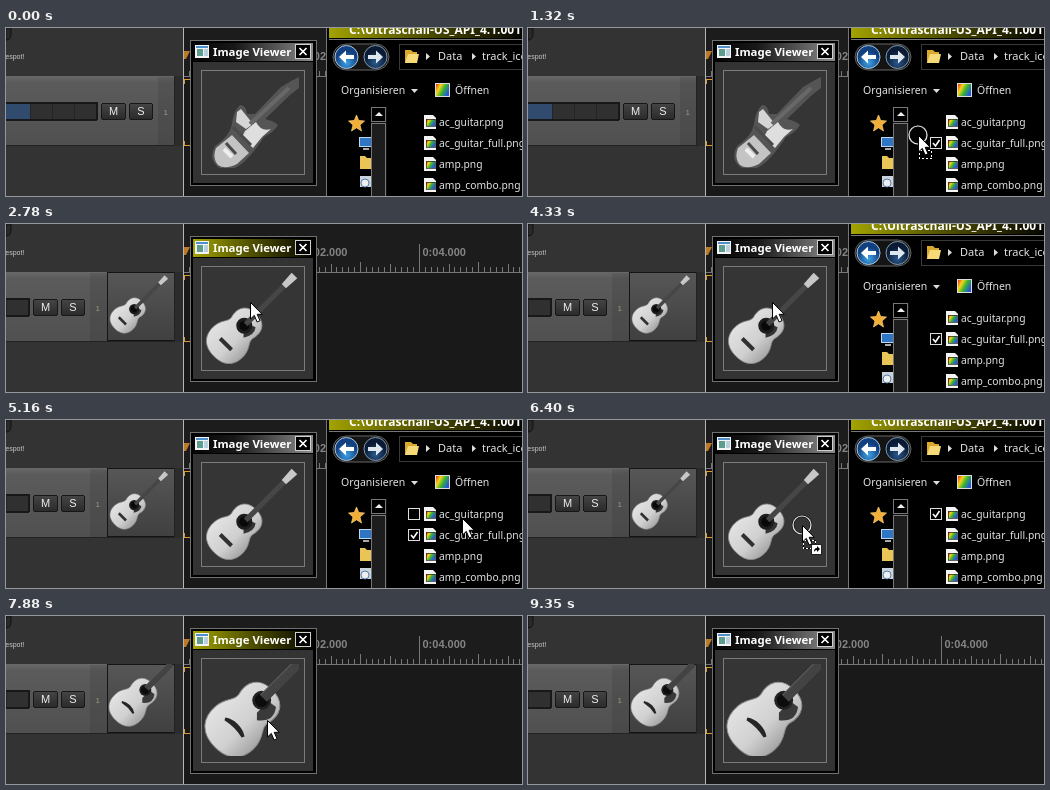
Write an HTML page that moves like this. It is 516 by 168 pixels and loops after 9450 ms.

```html
<!DOCTYPE html>
<html lang="en">
<head>
<meta charset="utf-8">
<title>Track icon by drag and drop</title>
<style>
html, body { margin: 0; width: 100%; height: 100%; overflow: hidden; background: #191919; }
svg { display: block; width: 516px; height: 168px; }
text { font-family: "Noto Sans", "Open Sans", sans-serif; fill: #e2e2e2; white-space: pre; }
.b { font-weight: 700; fill: #fff; }
.r { font: 700 11px "Liberation Sans", Arial, sans-serif; fill: #858585; }
.k { font: 11px "Liberation Sans", Arial, sans-serif; fill: #eee; text-anchor: middle; }
rect, .c { shape-rendering: crispEdges; }
</style>
</head>
<body>
<svg viewBox="0 0 516 168">
<defs>
  <linearGradient id="on"><stop offset="0" stop-color="#a3a300"/><stop offset=".45" stop-color="#555500"/><stop offset="1" stop-color="#050500"/></linearGradient>
  <linearGradient id="off"><stop offset="0" stop-color="#050505"/><stop offset=".35" stop-color="#181818"/><stop offset="1" stop-color="#8c8c8c"/></linearGradient>
  <linearGradient id="track" x2="0" y2="1"><stop offset="0" stop-color="#686868"/><stop offset=".1" stop-color="#5b5b5b"/><stop offset="1" stop-color="#505050"/></linearGradient>
  <linearGradient id="cell" x2="0" y2="1"><stop offset="0" stop-color="#575757"/><stop offset=".5" stop-color="#4b4b4b"/><stop offset="1" stop-color="#404040"/></linearGradient>
  <linearGradient id="btn" x2="0" y2="1"><stop offset="0" stop-color="#454545"/><stop offset="1" stop-color="#2a2a2a"/></linearGradient>
  <linearGradient id="wood" x1="0" y1="0" x2="0" y2="1"><stop offset="0" stop-color="#e2e2e2"/><stop offset=".6" stop-color="#d0d0d0"/><stop offset="1" stop-color="#a6a6a6"/></linearGradient>
  <linearGradient id="rain" x2="1" y2=".5"><stop offset="0" stop-color="#e02020"/><stop offset=".35" stop-color="#f6d418"/><stop offset=".65" stop-color="#35b332"/><stop offset="1" stop-color="#2858d8"/></linearGradient>
  <radialGradient id="blue" cy=".75"><stop offset="0" stop-color="#3fa4e8"/><stop offset="1" stop-color="#123f80"/></radialGradient>
  <radialGradient id="navy" cy=".75"><stop offset="0" stop-color="#2b5a8c"/><stop offset="1" stop-color="#0a1a34"/></radialGradient>
  <clipPath id="pic"><rect x="196" y="48" width="97" height="92"/></clipPath>
  <clipPath id="panel"><rect y="48" width="168" height="69"/></clipPath>

  <path id="body" d="M-20 0C-20-16-10-22 2-21C12-20 14-14 20-15C30-18 40-14 40 0C40 14 30 18 20 15C14 14 12 20 2 21C-10 22-20 16-20 0Z"/>
  <g id="full">
    <g transform="translate(222 118) rotate(-45)">
      <use href="#body" fill="url(#wood)" stroke="#8d8d8d" stroke-width=".8"/>
      <path d="M14 8Q24 14 30 9L28 4H18Z" fill="#333"/>
      <circle cx="23" r="8" fill="#1d1d1d"/><circle cx="23" r="5" fill="#090909"/>
      <path d="M25-2.6H80V2.6H25Z" fill="#464646"/>
      <path d="M79-3L94-4V4L79 3Z" fill="#c8c8c8"/>
      <path d="M-5-8H-1V8H-5Z" fill="#303030"/>
    </g>
  </g>
  <g id="half">
    <g transform="translate(228 112) rotate(-45) scale(1.35)">
      <use href="#body" fill="url(#wood)" stroke="#8d8d8d" stroke-width=".7"/>
      <path d="M16 8Q24 18 33 11L32 4H20Z" fill="#3a3a3a"/>
      <circle cx="29" r="7" fill="#222"/><circle cx="29" r="5" fill="#0c0c0c"/>
      <path d="M31-3.4H72V3.4H31Z" fill="#434343"/>
      <path d="M31-3.4H72" stroke="#5c5c5c" stroke-width=".8"/>
      <path d="M1-10Q4-6 4 0Q4 6 1 10L-1 9Q1 0-1-9Z" fill="#262626"/>
    </g>
  </g>
  <g id="electric">
    <path d="M275 59L287 52L293 49V60L284 67L259 91Q268 93 272 97Q268 104 258 109Q250 122 238 134Q224 146 212 139Q202 131 209 118Q224 108 226 96Q227 84 234 77Q240 77 241 86L249 86Z" fill="#555"/>
    <path d="M231 84L235 81L247 96L240 101L230 94Z" fill="#d6d6d6"/>
    <path d="M210 120L226 107L243 125L231 136Q219 142 212 137Q206 130 210 120Z" fill="#c4c4c4"/>
    <path d="M239 103L250 94Q255 104 265 101L256 109L247 120L236 109Z" fill="#dedede"/>
    <path d="M227 99L245 117M220 115L230 126" stroke="#4a4a4a" stroke-width="3"/>
    <path d="M218 121L226 129" stroke="#eee" stroke-width="4"/>
    <path d="M244 96L283 60" stroke="#686868" stroke-width="4"/>
  </g>
  <g id="file">
    <path d="M0 0H9L12 3V14H0Z" fill="#f4f4f4"/>
    <rect x="2" y="4" width="9" height="7" fill="url(#rain)" stroke="#222" stroke-width=".7"/>
  </g>
</defs>

<rect width="516" height="168" fill="#191919"/>
<rect x="178" width="338" height="48" fill="#1c1c1c"/>
<path id="ticks" class="c" stroke="#777" fill="none"/>
<text class="r" x="298" y="32">0:02.000</text>
<text class="r" x="416.5" y="32">0:04.000</text>

<rect width="177" height="168" fill="#333"/>
<path d="M0 0H5V6Q5 12 0 12Z" fill="#292929" stroke="#111"/>
<text x="-3" y="31" style="font:7px 'Liberation Sans',Arial,sans-serif;fill:#c8c8c8">respot!</text>
<g clip-path="url(#panel)">
  <rect y="48" width="168" height="69" fill="url(#track)"/>
  <g id="strip">
    <rect x="-20" y="74" width="112" height="19" rx="2" fill="#181818"/>
    <rect x="-20" y="76" width="110" height="15" fill="#303030"/>
    <rect x="-20" y="76" width="44" height="15" fill="#304b6d"/>
    <path class="c" d="M24.5 76V91M46.5 76V91M68.5 76V91" stroke="#252525"/>
    <rect x="95.5" y="75.5" width="24" height="16" rx="2" fill="url(#btn)" stroke="#171717"/>
    <rect x="123.5" y="75.5" width="23" height="16" rx="2" fill="url(#btn)" stroke="#171717"/>
    <text class="k" x="107.5" y="87">M</text><text class="k" x="135" y="87">S</text>
    <rect x="152" y="49" width="17" height="68" fill="#000" opacity=".09"/>
    <text x="157.5" y="87" style="font:8px 'Liberation Sans',Arial,sans-serif;fill:#a0957c">1</text>
  </g>
  <g id="icon">
    <rect x="101" y="48" width="67" height="69" fill="#141414"/>
    <rect x="102" y="49" width="66" height="67" fill="url(#cell)"/>
    <use id="thumb" transform="translate(-24.3 20) scale(.64)"/>
  </g>
</g>
<path class="c" d="M0 117.5H168M168.5 48V118" stroke="#222"/>
<rect x="169" y="48" width="8" height="70" fill="#2b2b2b"/>
<rect x="177" width="1" height="168" fill="#b5b5b5"/>
<path d="M178 23H184L180 31H178Z" fill="#bd7b25"/>
<path class="c" d="M184 51.5H178.5V56M184 117.5H178.5V113" stroke="#dc992f" fill="none"/>

<g>
  <rect x="184" y="12" width="127" height="146" fill="#000"/>
  <rect x="184.5" y="12.5" width="126" height="145" fill="none" stroke="#707070"/>
  <rect id="bar" x="187" y="15" width="120" height="18"/>
  <rect x="189" y="17" width="14" height="13" fill="#f4f4f4"/>
  <rect x="190" y="18" width="12" height="2" fill="#4f8fc9"/>
  <rect x="191" y="21" width="6" height="7" fill="#5e9d8d"/>
  <rect x="198" y="21" width="4" height="7" fill="#b8d0e0"/>
  <text class="b" x="207" y="28" font-size="11.4">Image Viewer</text>
  <rect x="289.5" y="16.5" width="15" height="14" fill="#000" stroke="#d0d0d0"/>
  <path d="M293.5 20L300.5 27M300.5 20L293.5 27" stroke="#fff" stroke-width="1.7"/>
  <rect x="187" y="34" width="120" height="121" fill="#333"/>
  <rect x="195.5" y="42.5" width="103" height="104" fill="#353535" stroke="#7b7b7b"/>
  <g clip-path="url(#pic)"><use id="photo"/></g>
</g>

<g id="explorer">
  <rect x="320" width="196" height="168" fill="#000"/>
  <rect x="320" width="1" height="168" fill="#777"/>
  <rect x="323" width="193" height="10" fill="url(#on)"/>
  <text class="b" x="343" y="6" font-size="12">C:\Ultraschall-US_API_4.1.001</text>
  <path class="c" d="M323 11.5H516" stroke="#777"/>
  <path d="M340 16H370Q382 17 383 29Q382 41 370 42H340Q328 41 327 29Q328 17 340 16Z" fill="#141414" stroke="#666"/>
  <circle cx="340.5" cy="29" r="11.5" fill="url(#blue)" stroke="#a9c8dd"/>
  <circle cx="369.5" cy="29" r="11.5" fill="url(#navy)" stroke="#8198aa"/>
  <path id="back" d="M333 29L340 22.5V27H348V31H340V35.5Z" fill="#fff"/>
  <path d="M377 29L370 22.5V27H362V31H370V35.5Z" fill="#dfe7ee"/>
  <path class="c" d="M516 16.5H393.5V41.5H516" fill="none" stroke="#3a3a3a"/>
  <path d="M399 22H405L407 24H411V35H399Z" fill="#d9a92d"/><path d="M402 26H413L411 35H399Z" fill="#f6da78"/>
  <path d="M420 25L424 28.5L420 32ZM466 25L470 28.5L466 32Z" fill="#ddd"/>
  <text x="432" y="32" font-size="11">Data</text>
  <text x="476" y="32" font-size="11">track_icons</text>
  <text x="335" y="66" font-size="10.5">Organisieren</text>
  <path d="M405 61H412L408.5 65Z" fill="#ddd"/>
  <rect x="429.5" y="55.5" width="14" height="13" fill="url(#rain)" stroke="#ddd"/>
  <text x="449" y="66" font-size="10.5">Öffnen</text>
  <path d="M350.500 87L352.700 92.500L358.500 93L354 97L355.500 103L350.500 99.800L345.500 103L347 97L342.500 93L348.300 92.500Z" fill="#f3ae35" stroke="#ffd680" stroke-width=".7"/>
  <rect x="353.500" y="109.500" width="12" height="9" fill="#2e75c4" stroke="#bcd6ee"/><rect x="357" y="120" width="6" height="2" fill="#aaa"/>
  <path d="M354 128H359L361 130H365V141H354Z" fill="#e9c456"/>
  <rect x="354" y="148" width="11" height="11" fill="#c9d3dc"/><circle cx="359" cy="155" r="4" fill="#eee" stroke="#557eaa"/>
  <rect x="365" y="79" width="16" height="89" fill="#111"/>
  <rect x="365.500" y="79.500" width="14" height="14" fill="#000" stroke="#777"/>
  <path d="M369 88H377L373 84Z" fill="#eee"/>
  <rect x="365.500" y="95.500" width="14" height="80" fill="#1d1d1d" stroke="#777"/>
  <g id="rows"></g>
</g>

<g id="cursor">
  <g id="dots">
    <rect x="1.500" y="15.500" width="12" height="8" fill="none" stroke="#000"/>
    <rect x="1.500" y="15.500" width="12" height="8" fill="none" stroke="#fff" stroke-dasharray="2 2"/>
  </g>
  <g id="link">
    <rect x="9.500" y="19.500" width="10" height="10" fill="#fff" stroke="#222"/>
    <path d="M12 27Q12 23 15 23V21L18 24L15 27V25Q13 25 12 27Z" fill="#000"/>
  </g>
  <circle id="ring" r="9" fill="none" stroke="#111" stroke-width="2.400"/>
  <circle id="halo" r="9" fill="none" stroke="#e8e8e8" stroke-width="1.200"/>
  <path d="M.5 .5V17L4.300 13.400L7.100 20L10 18.700L7.200 12.300H12.200Z" fill="#fff" stroke="#000"/>
</g>
</svg>
<script>
const LOOP = 9450;
const $ = id => document.getElementById(id);
const show = (id, on) => $(id).setAttribute("display", on ? "inline" : "none");
const within = (t, a, b) => t >= a && t < b;

let marks = "M178 48.5H516";
for (let i = -20; i < 38; i++) {
  const h = i % 20 === 0 ? 28 : i % 10 === 0 ? 10 : i % 5 === 0 ? 8 : 5;
  const x = Math.round(295 + i * 5.9) + .5;
  if (x > 178) marks += `M${x} 48V${48 - h}`;
}
$("ticks").setAttribute("d", marks);

const files = ["ac_guitar", "ac_guitar_full", "amp", "amp_combo"];
$("rows").innerHTML = files.map((name, i) => `
  <g transform="translate(0 ${94 + 21 * i})">
    <g id="box${i}"><rect x="402.5" y="-5.5" width="11" height="11" fill="#000" stroke="#ddd"/>
    <path id="tick${i}" d="M405 0L407.500 3L411.500-3" fill="none" stroke="#fff" stroke-width="1.600"/></g>
    <use href="#file" x="418" y="-7"/>
    <text x="433" y="4" font-size="10.3">${name}.png</text>
  </g>`).join("");

// Stepped moves: first and last step time, step count, [progress, x, y] stops.
const moves = [
  [430, 1320, 15, [[0, 520, 172], [.45, 466, 126], [.7, 444, 113], [1, 390, 107]]],
  [1380, 1740, 7, [[0, 390, 107], [.5, 306, 92], [1, 244, 78]]],
  [4570, 5400, 14, [[0, 244, 78], [.3, 320, 83], [.714, 456, 98], [1, 451, 97]]],
  [5520, 5930, 8, [[0, 451, 97], [.5, 386, 95], [1, 340, 98]]],
  [6110, 6640, 10, [[0, 340, 98], [.5, 274, 105], [.9, 261, 104], [1, 261, 104]]],
  [8750, 9040, 6, [[0, 261, 104], [.4, 320, 124], [1, 440, 172]]]
];

function pointer(t) {
  let pos = [520, 172];
  for (const [from, to, n, stops] of moves) {
    if (t < from) break;
    const step = Math.floor((t - from) / (to - from) * (n - 1) + 1e-6);
    const p = Math.min(1, (step + 1) / n);
    const j = Math.max(1, stops.findIndex(s => s[0] >= p));
    const [a, b] = [stops[j - 1], stops[j]];
    const k = (p - a[0]) / (b[0] - a[0]);
    pos = [1, 2].map(c => Math.round(a[c] + (b[c] - a[c]) * k));
  }
  return pos;
}

function draw(t) {
  const [x, y] = pointer(t);
  const open = t < 2660 || within(t, 4330, 7760);
  const active = within(t, 2660, 4330) || within(t, 7700, 9350);
  const drag = within(t, 1066, 1920) || within(t, 5520, 6640);
  const press = drag || within(t, 1002, 1066) || within(t, 5400, 5520) ||
    within(t, 2660, 2780) || within(t, 7700, 7880);
  const overViewer = x < 311;
  const picked = t < 1002 ? -1 : t < 5400 ? 1 : 0;
  const hover = !drag && x > 398 && y >= 84 ? Math.floor((y - 84) / 21) : -1;
  const hasIcon = t >= 2720;

  show("explorer", open);
  files.forEach((_, i) => {
    show("box" + i, i === picked || i === hover);
    show("tick" + i, i === picked);
  });
  $("bar").setAttribute("fill", active ? "url(#on)" : "url(#off)");
  $("photo").setAttribute("href", t < 1920 ? "#electric" : t < 6640 ? "#full" : "#half");
  $("thumb").setAttribute("href", t < 7820 ? "#full" : "#half");
  show("icon", hasIcon);
  $("strip").setAttribute("transform", `translate(${hasIcon ? -68 : 0} 0)`);

  show("cursor", y < 168);
  $("cursor").setAttribute("transform", `translate(${x} ${y})`);
  show("ring", press);
  show("halo", press);
  show("dots", drag);
  show("link", drag && overViewer);
}

const start = performance.now();
function tick() {
  draw((performance.now() - start) % LOOP);
  requestAnimationFrame(tick);
}
tick();
</script>
</body>
</html>
```
